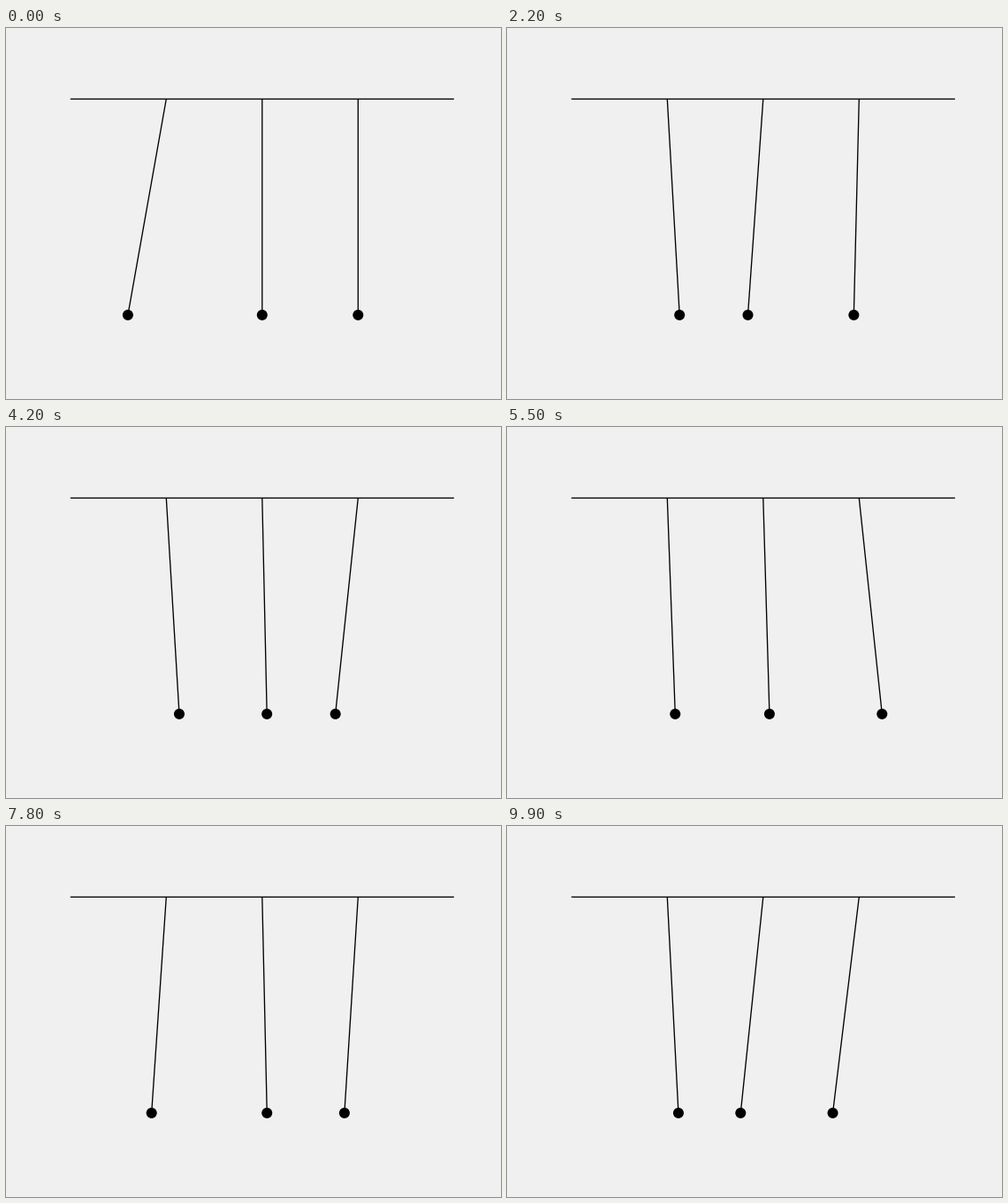
These frames come from a looping animation (560 by 420 pixels, 10000 ms). A matplotlib script:

```python
import numpy as np
import matplotlib.pyplot as plt
from matplotlib.animation import FuncAnimation
from matplotlib.patches import Circle

# Three pendulums, neighbours joined by weak springs (unit mass and length)
W, H, DPI = 560, 420, 100
FRAMES, DURATION = 100, 20.0
G, K, START = 9.81, 1.0, -0.4

PX = 72 / DPI                # points per pixel
UNIT_X, UNIT_Y = 108.5, 244.5
MID_X, BAR_Y = 289.8, 80.4
PIVOTS = MID_X + UNIT_X * np.array([-1, 0, 1])
BOB_Y = BAR_Y + UNIT_Y

# Normal modes and their frequencies
MODES = np.array([[1, 1, 1], [1, 0, -1], [1, -2, 1]])
WEIGHTS = START / np.array([3, 2, 6])
OMEGA = np.sqrt(G + K * np.array([0, 1, 3]))


def bob_positions(i):
    t = i * DURATION / (FRAMES - 1)
    shift = (WEIGHTS * np.cos(OMEGA * t)) @ MODES
    return PIVOTS + UNIT_X * shift


plt.rcParams["path.snap"] = False
fig = plt.figure(figsize=(W / DPI, H / DPI), dpi=DPI, facecolor="#f0f0f0")
ax = fig.add_axes([0, 0, 1, 1])
ax.set(xlim=(0, W), ylim=(H, 0))
ax.axis("off")

style = dict(color="black", lw=1.33 * PX, solid_capstyle="butt")
ax.plot([MID_X - 2 * UNIT_X, MID_X + 2 * UNIT_X], [BAR_Y, BAR_Y], **style)
strings = [ax.plot([x, x], [BAR_Y, BOB_Y], **style)[0] for x in PIVOTS]
bobs = [ax.add_patch(Circle((x, BOB_Y), 6, fc="black", lw=0)) for x in PIVOTS]


def update(i):
    for pivot, x, string, bob in zip(PIVOTS, bob_positions(i), strings, bobs):
        string.set_xdata([pivot, x])
        bob.center = x, BOB_Y
    return strings + bobs


anim = FuncAnimation(fig, update, frames=FRAMES, interval=100,
                     repeat=True, repeat_delay=0)
plt.show()
```
